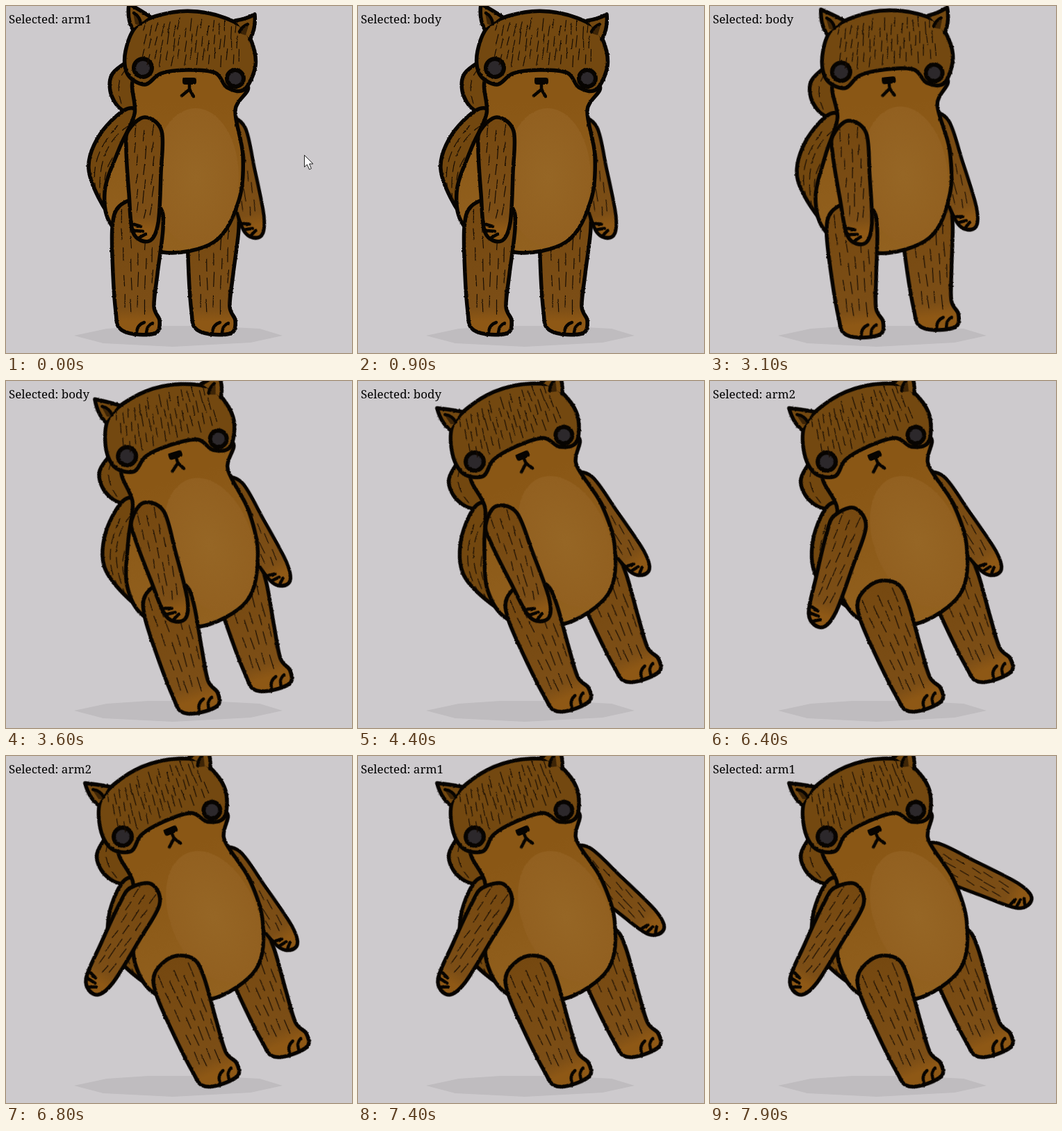
An HTML page for the animation above (8000 ms loop, 498 by 499 pixels).

```html
<!DOCTYPE html>
<html lang="en">
<head>
<meta charset="utf-8">
<title>Puppet posing</title>
<style>
html, body { margin: 0; width: 100%; height: 100%; overflow: hidden; background: #cdcacd; }
svg { display: block; width: 100vw; height: 100vh; }
text { font: 17px "Noto Serif", serif; }
.ink, .mark { stroke: #070401; stroke-width: 5.5; stroke-linejoin: round; stroke-linecap: round; }
.mark { fill: none; stroke-width: 4.5; }
.hair { fill: none; stroke: #180d03; stroke-width: 1.2; stroke-linecap: round; }
.solid { fill: #070401; }
.iris { fill: #2c282b; }
</style>
</head>
<body>
<svg viewBox="0 0 498 499">
  <defs>
    <filter id="rough" x="-10%" y="-10%" width="120%" height="120%" color-interpolation-filters="sRGB">
      <feTurbulence type="fractalNoise" baseFrequency=".35" seed="4"/>
      <feDisplacementMap in="SourceGraphic" scale="2.5" xChannelSelector="R" yChannelSelector="G"/>
    </filter>
    <linearGradient id="limb" x2="0" y2="1">
      <stop offset="0" stop-color="#754810"/>
      <stop offset=".8" stop-color="#7c4e16"/>
      <stop offset=".9" stop-color="#8e5815"/>
    </linearGradient>
    <linearGradient id="skin" x2="0" y2="1">
      <stop offset=".2" stop-color="#8a5715"/>
      <stop offset="1" stop-color="#92611f"/>
    </linearGradient>
    <radialGradient id="belly">
      <stop offset="0" stop-color="#966625"/>
      <stop offset="1" stop-color="#926020"/>
    </radialGradient>

    <g id="arm" filter="url(#rough)">
      <path class="ink" fill="url(#limb)" data-pts="176,179 200,160 224,180 223,240 219,312 206,338 183,326 177,270 173,205"/>
      <path class="mark" d="M181 313l13 4M184 323l13 1M192 333l9-5"/>
    </g>
    <g id="leg" filter="url(#rough)">
      <path class="ink" fill="url(#limb)" data-pts="153,318 163,288 195,276 222,290 226,320 218,385 213,432 221,452 216,470 185,472 163,463 158,440 154,385"/>
      <path class="mark" d="M188 469q1-11 11-14M202 470q1-11 9-14"/>
    </g>
  </defs>

  <path d="M98 474 145 464 205 460H290L365 464 398 474 352 484 240 490 140 485Z" fill="#bfbcbf"/>

  <g id="puppet">
    <g filter="url(#rough)" fill="#72470f">
      <path class="ink" data-pts="190,152 165,148 150,122 156,94 195,78"/>
      <path class="ink" data-pts="190,155 145,172 119,234 155,308 190,300"/>
      <path class="hair" stroke-dasharray="15 8" d="M176 88Q155 105 166 140M180 170Q128 200 136 280M161 172Q120 215 129 262M168 200Q144 225 142 250"/>
    </g>
    <use href="#leg" x="109"/>
    <g id="armR">
      <use href="#arm" transform="translate(318 160) rotate(-14) scale(.9 1) translate(-200 -160)"/>
    </g>
    <g filter="url(#rough)">
      <path class="ink" fill="url(#skin)" data-pts="187,100 185,155 163,205 142,268 156,320 225,354 300,339 335,280 341,215 330,150 346,112 265,85"/>
      <ellipse cx="273" cy="246" rx="62" ry="99" fill="url(#belly)"/>
    </g>
    <g id="head" filter="url(#rough)">
      <path class="ink" fill="#734810" data-pts="190,27 240,9 290,10 336,27 353,50 359,86 343,120 318,117 301,96 260,92 223,97 200,113 175,98 172,65"/>
      <path class="ink" fill="#734810" d="M182 33Q174 18 177-3 190 4 207 15M330 21Q345 19 358 12 360 32 351 48"/>
      <path fill="#3d2406" d="M183 10Q196 14 194 28L186 26ZM350 25Q336 28 335 39L345 42Z"/>
      <path class="mark" d="M184 10q9 5 10 16M336 37q4-8 12-11"/>
      <circle class="solid" cx="197" cy="89" r="16"/>
      <circle class="iris" cx="197" cy="89" r="10"/>
      <circle class="solid" cx="330" cy="104" r="15"/>
      <circle class="iris" cx="330" cy="104" r="9"/>
      <rect class="solid" x="254" y="103" width="20" height="10" rx="4"/>
      <path class="mark" d="M264 112v8l-11 9M264 120l6 10"/>
    </g>
    <use href="#leg"/>
    <g id="armL"><use href="#arm"/></g>
  </g>

  <text id="label" x="4" y="25"></text>
  <path id="cursor" d="M429.5 214.5v17l4-3.5 3 7 3-1.3-3-6.7h5.5z" fill="#fff" stroke="#222"/>
</svg>
<script>
const $ = id => document.getElementById(id);

// Closed Catmull-Rom curve through the key points
function smooth(pts) {
  const at = i => pts[(i + pts.length) % pts.length];
  const curves = pts.map((b, i) => {
    const a = at(i - 1), c = at(i + 1), e = at(i + 2);
    return `C${b.map((v, k) => v + (c[k] - a[k]) / 6)} ${c.map((v, k) => v - (e[k] - b[k]) / 6)} ${c}`;
  });
  return `M${pts[0]}${curves.join('')}Z`;
}
for (const p of document.querySelectorAll('[data-pts]'))
  p.setAttribute('d', smooth(p.dataset.pts.split(' ').map(s => s.split(',').map(Number))));

let seed = 11;
const rand = () => (seed = seed * 16807 % 2147483647) / 2147483647;
const jitter = r => (rand() - .5) * r;

// Rows of loose strokes; spread widens (or narrows) the patch towards its foot
function hair(id, x, y, w, h, cols, rows, len, spread, lean = 2) {
  let d = '';
  for (let c = 0; c < cols; c++) for (let r = 0; r < rows; r++) {
    const u = (c + .5 + jitter(.3)) / cols - .5;
    const v = (r + .3 + c % 2 * .35 + jitter(.3)) / rows;
    const l = len * (.8 + rand() * .4);
    const dx = u * spread * l / h - lean + jitter(2);
    d += `M${x + w / 2 + u * (w + spread * v)} ${y + h * v - l / 2}l${dx} ${l}`;
  }
  $(id).insertAdjacentHTML('beforeend', `<path class="hair" d="${d}"/>`);
}
hair('head', 200, 22, 134, 62, 17, 3, 15, 14);
hair('arm', 181, 175, 38, 130, 3, 6, 15, -6);
hair('leg', 160, 292, 60, 150, 5, 5, 18, -12, 0);

// Each key press turns the selected part by a tenth of a radian
const LOOP = 8000, STEP = 18 / Math.PI;
const parts = [
  { id: 'puppet', pivot: '249 174', turn: -1, presses: [3100, 3300, 3600, 4400] },
  { id: 'armL', pivot: '196 173', turn: 1, presses: [5500, 5600, 5800, 6000, 6100, 6400, 6400, 6600, 6800] },
  { id: 'armR', pivot: '311 176', turn: -1, presses: [7300, 7400, 7600, 7800, 7900] },
];
const selected = t => t < 900 || t >= 7100 ? 'arm1' : t < 5000 ? 'body' : 'arm2';

function draw(now) {
  const t = now % LOOP;
  for (const { id, pivot, turn, presses } of parts) {
    const count = presses.filter(p => p <= t).length;
    $(id).setAttribute('transform', `rotate(${turn * count * STEP} ${pivot})`);
  }
  $('label').textContent = `Selected: ${selected(t)}`;
  $('cursor').setAttribute('transform', t < 600 ? '' : 'translate(47 1)');
  $('cursor').setAttribute('visibility', t < 800 ? 'visible' : 'hidden');
}
function tick() {
  draw(performance.now());
  requestAnimationFrame(tick);
}
draw(0);
requestAnimationFrame(tick);
</script>
</body>
</html>
```
